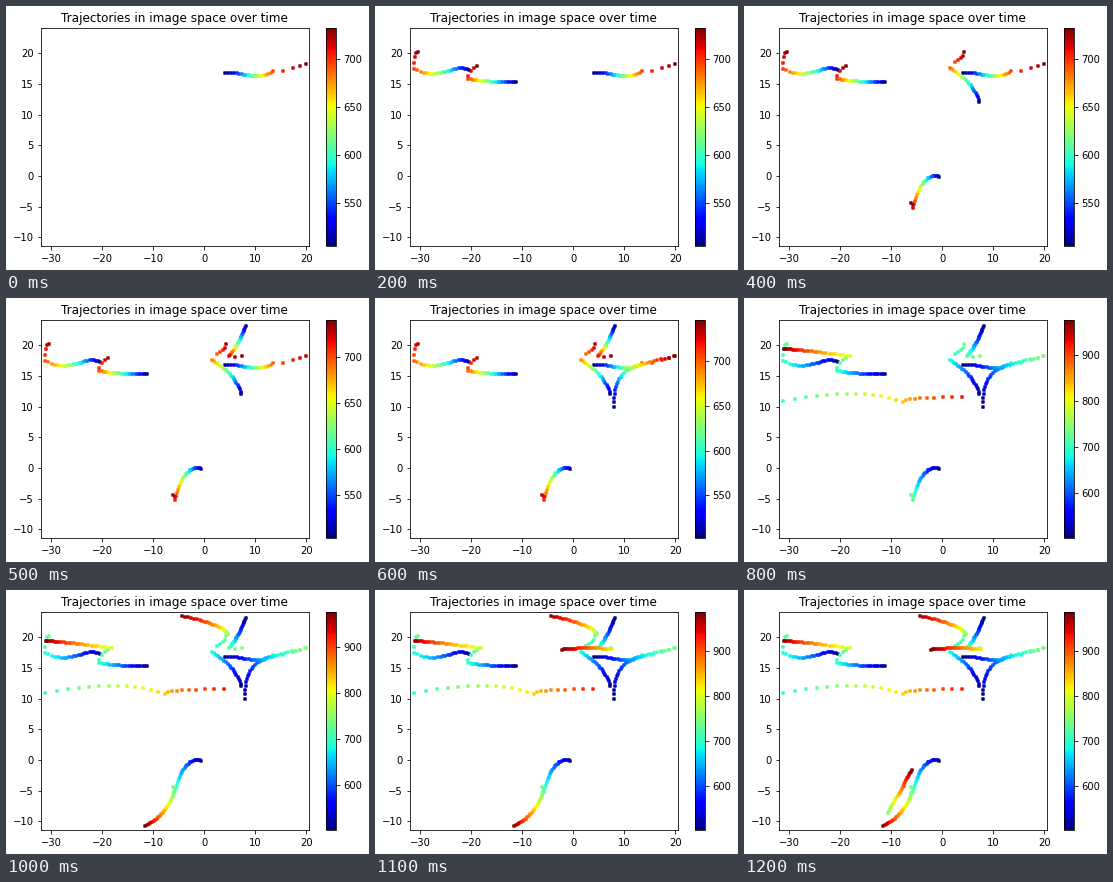
A matplotlib script that plays this animation: 363x264 px, repeating every 1.3 s.

```python
import numpy as np
import matplotlib.pyplot as plt
from matplotlib.animation import FuncAnimation

W, H, DPI = 363, 264, 72
plt.rcParams["font.family"] = "DejaVu Sans"


def bezier(count, *ctrl):
    """Dots along a Bezier curve; points are complex numbers x + yj."""
    u = np.linspace(0, 1, count)
    pts = [np.full(count, c, dtype=complex) for c in ctrl]
    while len(pts) > 1:
        pts = [a + (b - a) * u for a, b in zip(pts, pts[1:])]
    return pts[0]


def track(t0, t1, *legs):
    """Join the legs into one path, evenly timed from t0 to t1."""
    z = np.concatenate([bezier(*leg) for leg in legs])
    return np.column_stack([z.real, z.imag, np.linspace(t0, t1, len(z))])


tracks = [
    track(505, 732, (21, 4.1+16.75j, 8.5+17j, 10+15.4j, 13.6+17.1j),
          (4, 15.5+17.2j, 18.7+17.9j, 19.9+18.2j)),
    track(505, 732, (23, -20.3+17.3j, -23.5+18.5j, -26+15.2j, -31.2+17.5j),
          (4, -31.2+18.4j, -31+20.2j, -30.4+20.2j)),
    track(505, 732, (22, -11.1+15.3j, -16+15.2j, -20.5+15.8j),
          (4, -20.6+16.3j, -19.5+17.8j, -18.8+17.9j)),
    track(505, 732, (20, 7.3+12.1j, 5.9+15.6j, 1.5+17.6j),
          (5, 2.5+18.6j, 4+19j, 4.3+20.2j)),
    track(505, 732, (21, -0.5-0.1j, -4.1+0.6j, -5.6-5.2j),
          (2, -5.7-4.7j, -6-4.4j)),
    track(503, 740, (21, 8.2+23.2j, 6.8+20j, 4.9+18.3j),
          (2, 6.1+18.1j, 7.4+18.2j)),
    track(503, 745, (28, 8+10j, 8+17j, 12+16.5j, 19.7+18.2j)),
    track(700, 925, (14, -31.1+10.9j, -16+13.4j, -7.7+10.7j),
          (9, -7+11.1j, -4.5+11.6j, 4+11.5j)),
    track(790, 975, (26, -18+18.2j, -27+19.3j, -31+19.4j)),
    track(740, 975, (25, 4.7+20.5j, 3.5+22.2j, -4.4+23.5j)),
    track(720, 975, (24, -5.7-4.8j, -7.3-9.3j, -11.6-10.7j)),
    track(820, 985, (26, 7.6+18.1j, 2+18.4j, -2.2+18j)),
    track(745, 985, (25, -10.6-8.6j, -8-5j, -5.9-1.6j)),
]

fig = plt.figure(figsize=(W / DPI, H / DPI), dpi=DPI, facecolor="white")


def axes_px(left, bottom, width, height):
    return fig.add_axes([left / W, bottom / H, width / W, height / H])


ax = axes_px(34.95, 24.3, 267.84, 217.44)
cax = axes_px(319.55, 24.3, 10.87, 217.44)
ax.set(xlim=(-31.95, 20.52), ylim=(-11.38, 24.1),
       xticks=range(-30, 21, 10), yticks=range(-10, 21, 5))
ax.tick_params(axis="x", pad=4.4)
ax.set_title("Trajectories in image space over time", fontsize=12)
dots = ax.scatter([0], [0], c=[0], s=4, marker="s", linewidths=1.5,
                  cmap="jet", vmin=505, vmax=732)
bar = fig.colorbar(dots, cax=cax)


def draw(n):
    pts = np.vstack(tracks[:n + 1])
    t = pts[:, 2]
    lo, hi = t.min(), t.max()
    dots.set_offsets(pts[:, :2])
    dots.set_array(t)
    dots.set_clim(lo, hi)
    step = 50 if hi - lo < 300 else 100
    bar.set_ticks(np.arange(np.ceil(lo / step) * step, hi, step))
    return [dots]


anim = FuncAnimation(fig, draw, frames=len(tracks), interval=100,
                     init_func=lambda: draw(0), repeat=True, repeat_delay=0)
plt.show()
```
